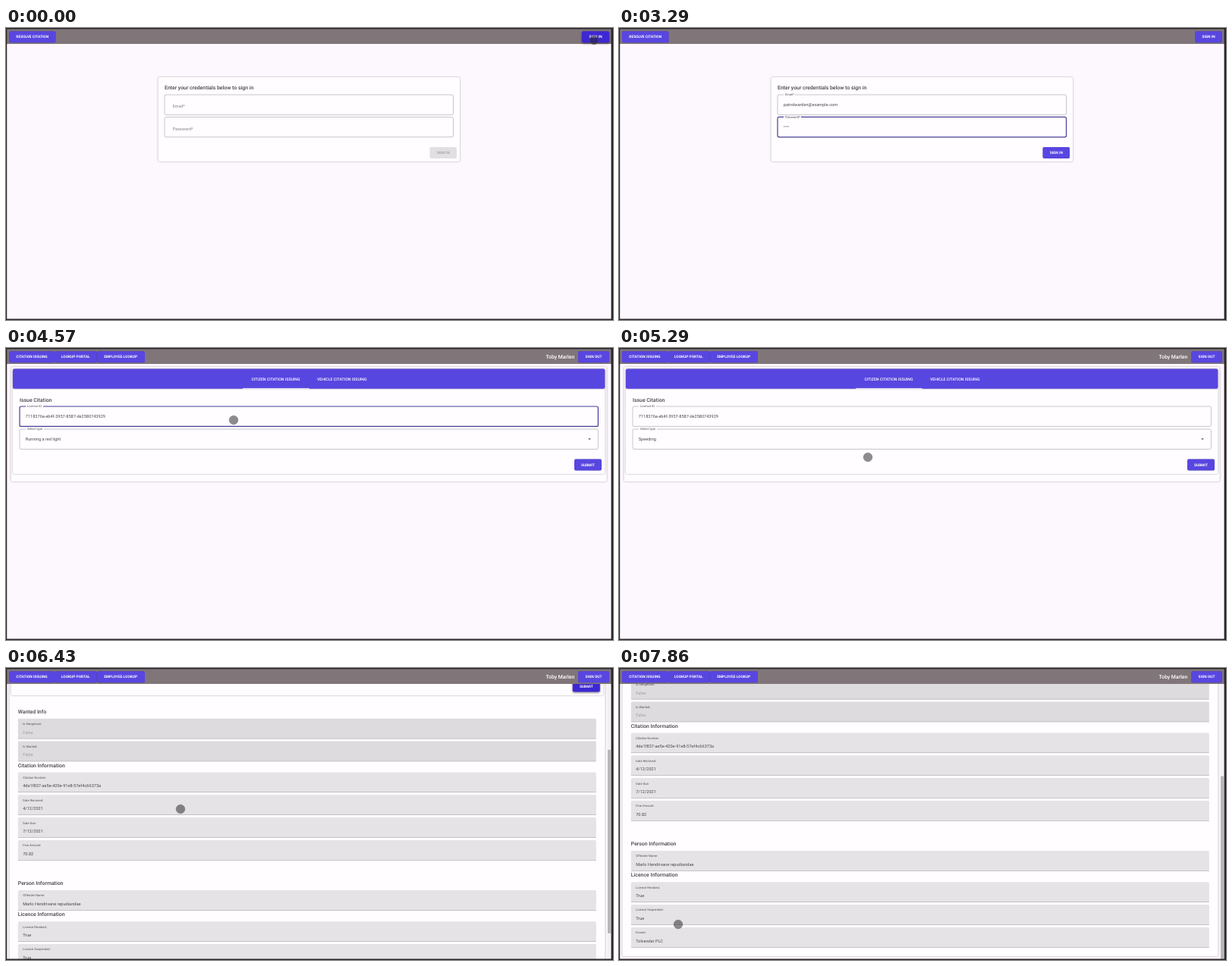
Write an HTML page that moves like this. It is 800 px wide and 385 px high and loops after 8 s.

```html
<!DOCTYPE html>
<html lang="en">
<head>
<meta charset="utf-8">
<title>Citation portal</title>
<style>
  html, body { margin: 0; width: 100%; height: 100%; overflow: hidden; background: #fdf8fd; }
  svg { display: block; width: 100vw; height: 100vh; }
  text { font-family: Roboto, "Liberation Sans", sans-serif; text-rendering: geometricPrecision; white-space: pre; }
  .mid { text-anchor: middle; }
  .med { font-weight: 500; }
  .bold { font-weight: 700; }
  .head { font-weight: 500; fill: #454248; }
  .value { fill: #4b494d; }
  .hint { fill: #858289; }
  .label { fill: #55525a; }
  .dim { fill: #a19fa3; }
  .white { fill: #fff; }
  .card { fill: #fffdff; filter: drop-shadow(0 .7px .8px rgba(50, 35, 45, .42)); }
  .bar { fill: #5846e0; filter: drop-shadow(0 .8px .8px rgba(0, 0, 0, .28)); }
  .btn rect { fill: #5846e0; filter: drop-shadow(0 .7px .7px rgba(0, 0, 0, .32)); }
  .btn text { fill: #fff; }
  .btn.hover rect { fill: #3d27d2; filter: drop-shadow(0 1px 1.4px rgba(0, 0, 0, .5)); }
  .btn.off rect { fill: #e1dfe1; filter: none; }
  .btn.off text { fill: #aaa8ab; }
  .outline { fill: none; stroke: #b9b6c0; stroke-width: .8; }
  .focus .outline { stroke: #463e94; stroke-width: 1.2; }
  .gap { fill: #fffdff; }
  .fill { fill: #e5e3e6; }
  .fill.flat { fill: #dddbde; }
  .rule { fill: #b3b0b5; }
  .field .float, .field.full .rest { display: none; }
  .field.full .float { display: inline; }
</style>
</head>
<body>
<svg id="stage" viewBox="0 0 800 385" preserveAspectRatio="none"></svg>
<script>
const LOOP = 8000, TICKS = 56;
const EMAIL = "patrolwarden@example.com";
const LICENCE = "7118376a-eb4f-3957-8587-de2580743929";

// Text is placed by the vertical centre of its capitals.
const text = (x, cy, s, size, cls) =>
  `<text x="${x}" y="${cy + size * 0.355}" font-size="${size}" class="${cls}">${s}</text>`;

const rect = (x, y, w, h, cls, r = 0) =>
  `<rect x="${x}" y="${y}" width="${w}" height="${h}" rx="${r}" class="${cls}"/>`;

const button = (x, y, w, s, id = "") =>
  `<g class="btn" id="${id}">${rect(x, y, w, 15, "", 2)}${text(x + w / 2, y + 7.3, s, 4.85, "mid bold")}</g>`;

const field = (id, x, y, w, label, gap) => `<g class="field" id="${id}">
  ${rect(x, y, w, 26.4, "outline", 2)}
  <g class="rest">${text(x + 10.4, y + 15.3, label, 5.6, "hint")}</g>
  <g class="float">${rect(x + 8, y - 1, gap, 2, "gap")}${text(x + 10, y, label, 4.1, "label")}</g>
  ${text(x + 7.8, y + 13, "", 5.6, "value")}</g>`;

const entry = (y, label, value, flat) =>
  rect(18, y, 762, 26.5, flat ? "fill flat" : "fill", 1.5) + rect(18, y + 26, 762, 0.7, "rule") +
  text(24.4, y + 7, label, 4.1, "label") + text(24.4, y + 17.8, value, 5.6, flat ? "dim" : "value");

const head = (x, cy, s) => text(x, cy, s, 6.9, "head");

const login = `<g id="login">
  ${rect(200.5, 65, 397.5, 111, "card", 2)}
  ${head(209, 78.5, "Enter your credentials below to sign in")}
  ${field("email", 209, 88, 380.5, "Email*", 15)}
  ${field("password", 209, 117.4, 380.5, "Password*", 23)}
  ${button(558.5, 157, 35.5, "SIGN IN", "send")}
</g>`;

const results = `<g id="results">
  ${head(18, 188, "Wanted Info")}
  ${entry(196.8, "Is Dangerous:", "False", true)}
  ${entry(226.6, "Is Wanted:", "False", true)}
  ${head(18, 258.3, "Citation Information")}
  ${entry(267.4, "Citation Number:", "4de1f837-ae5e-420e-91e8-57ef4c66373a")}
  ${entry(297.2, "Date Recieved:", "4/12/2021")}
  ${entry(327.1, "Date Due:", "7/12/2021")}
  ${entry(357, "Fine Amount:", "70.82")}
  ${head(18, 414, "Person Information")}
  ${entry(423, "Offender Name:", "Marlo Hendrivane repudiandae")}
  ${head(18, 455, "Licence Information")}
  ${entry(464.2, "Licence Revoked:", "True")}
  ${entry(494, "Licence Suspended:", "True")}
  ${entry(524, "Insurer:", "Tolvender PLC")}
</g>`;

const portal = `<g id="portal">
  <rect id="sheet" x="6.7" y="25" width="785" rx="2" class="card"/>
  ${rect(9, 28, 780.3, 138, "card", 2)}
  ${rect(9, 27.6, 780.3, 26.2, "bar", 2)}
  ${text(355.5, 40.8, "CITIZEN CITATION ISSUING", 5.2, "mid med white")}
  ${text(442.7, 40.8, "VEHICLE CITATION ISSUING", 5.2, "mid med white")}
  ${rect(312, 52.9, 87.5, 0.9, "white")}
  ${head(18, 68.3, "Issue Citation")}
  ${field("licence", 18, 77, 762.4, "Licence ID", 23)}
  ${field("kind", 18, 107, 762.4, "Select type", 24)}
  <path d="M767 119.2h4l-2 2z" fill="#666369"/>
  ${button(749, 146.5, 36, "SUBMIT", "submit")}
  ${results}
</g>`;

const nav = `<rect x="1" y="2" width="797" height="19" fill="#80767a"/>
<g id="guest">${button(4, 4.2, 61.5, "RESOLVE CITATION")}${button(759, 4.2, 36, "SIGN IN", "enter")}</g>
<g id="member">
  ${button(4, 4.2, 60, "CITATION ISSUING")}${button(64, 4.2, 55.5, "LOOKUP PORTAL")}
  ${button(119.3, 4.2, 63.7, "EMPLOYEE LOOKUP")}
  ${text(711.5, 11.7, "Toby Marlen", 6.9, "med white")}
  ${button(754, 4.2, 41, "SIGN OUT")}
</g>`;

const $ = id => document.getElementById(id);
$("stage").innerHTML = `<rect width="800" height="385" fill="#fdf8fd"/>${login}${portal}
<g id="scroller"><rect x="792.5" y="21" width="5" height="363" fill="#f4f1f5"/>
  <rect id="thumb" x="793" width="4" height="242" fill="#b9b6bb"/></g>${nav}
<path d="M0 0H800V385H0ZM1.2 1.8V383.5H797.6V1.8Z" fill="#2a2428" fill-rule="evenodd"/>
<circle id="pointer" r="5.8" fill="rgba(40,38,42,.53)" stroke="rgba(90,86,92,.4)" stroke-width="1"/>`;

// Pointer keys: tick, x, y.
const PATH = [
  [0, 775, 16], [1, 742, 27], [3, 520, 78], [5, 393, 101], [24, 393, 101], [27, 393, 185],
  [28, 393, 200], [30, 300, 95], [32, 300, 95], [34, 318, 120], [35, 322, 124], [36, 327, 142],
  [37, 328, 144], [38, 460, 148], [40, 766, 154], [41, 766, 154], [43, 438, 204],
  [45, 230, 186], [47, 112, 171], [49, 110, 110], [51, 128, 150], [52, 146, 215],
  [53, 118, 280], [55, 78, 338]
];
const SCROLL = [[43, 0], [44, 50], [45, 130], [46, 182]];

function at(keys, t) {
  const i = keys.findIndex(k => k[0] > t);
  if (i < 0) return keys[keys.length - 1].slice(1);
  if (i === 0) return keys[0].slice(1);
  const a = keys[i - 1], b = keys[i], p = (t - a[0]) / (b[0] - a[0]);
  return a.slice(1).map((v, n) => v + (b[n + 1] - v) * p);
}

const show = (id, on) => { $(id).style.display = on ? "" : "none"; };

function setField(id, value, focused) {
  const el = $(id);
  el.lastElementChild.textContent = value;
  el.classList.toggle("full", focused || value !== "");
  el.classList.toggle("focus", focused);
}

function draw(t) {
  const inside = t >= 28, done = t >= 42;
  show("login", !inside);
  show("guest", !inside);
  show("portal", inside);
  show("member", inside);
  show("results", done);
  show("scroller", done);

  setField("email", EMAIL.slice(0, Math.max(0, (t - 6) * 4)), t >= 6 && t < 14);
  setField("password", "•".repeat(Math.min(4, Math.max(0, t - 14))), t >= 14);
  setField("licence", t >= 32 && !done ? LICENCE : "", t >= 30 && t < 34);
  setField("kind", t >= 36 && !done ? "Speeding" : "Running a red light", t >= 34 && t < 36);
  $("send").classList.toggle("off", t < 15);
  $("enter").classList.toggle("hover", t < 1);
  $("submit").classList.toggle("hover", t >= 40);

  const [top] = at(SCROLL, t);
  $("sheet").setAttribute("height", done ? 537 : 151);
  $("portal").setAttribute("transform", `translate(${done ? -2.2 : 0} ${-top})`);
  $("thumb").setAttribute("y", 21 + top * 0.668);

  const [x, y] = at(PATH, t);
  $("pointer").setAttribute("transform", `translate(${x} ${y})`);
  show("pointer", t < 7 || t >= 25);
}

let start, last;
function frame(now) {
  start ??= now;
  const t = Math.floor(((now - start) % LOOP + 3) * TICKS / LOOP) % TICKS;
  if (t !== last) draw(last = t);
  requestAnimationFrame(frame);
}
draw(0);
requestAnimationFrame(frame);
</script>
</body>
</html>
```
